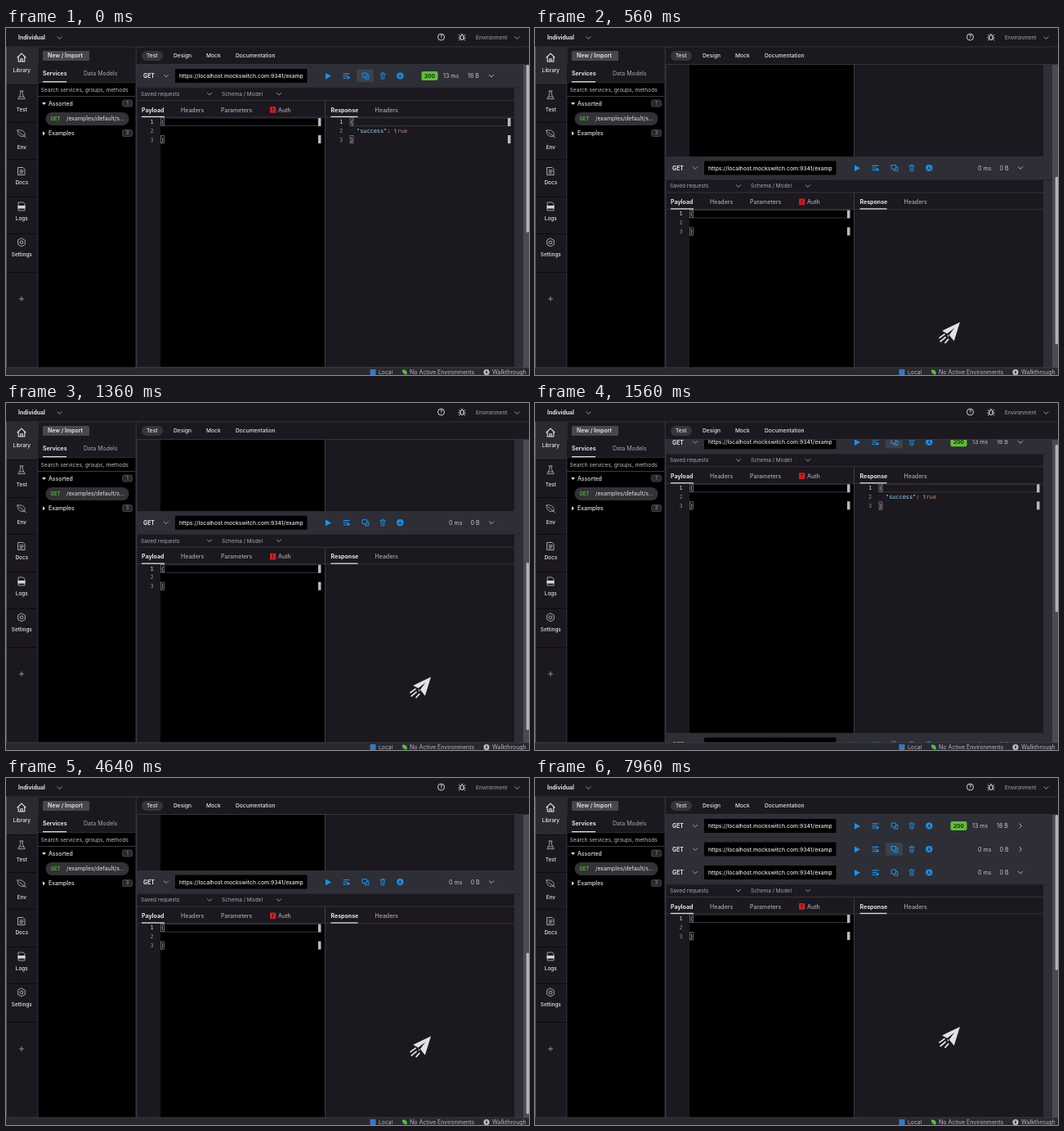
These frames come from a looping animation (640x424 px, 8000 ms). An HTML page:

```html
<!DOCTYPE html>
<html lang="en">
<head>
<meta charset="utf-8">
<style>
html, body { margin: 0; width: 100%; height: 100%; overflow: hidden; background: #1c1820; }
svg { display: block; width: 100vw; height: 100vh; }
text { font-family: Inter, Roboto, sans-serif; white-space: pre; }
.mono { font-family: "DejaVu Sans Mono", "Liberation Mono", monospace; }
</style>
</head>
<body>
<svg id="stage" viewBox="0 0 640 424"></svg>
<script>
const LOOP = 8000;
const FIRST = 58.5, OPEN = 369.5, CLOSED = 28.5, VIEW = 379, TOP = 45, TRACK = 385;
const BLUE = '#1c93ea', INK = '#e4e4e8', DIM = '#a9a8af', BAND = '#2e2e36', BASE = '#1c1820', EDGE = '#3a393f';

const rect = (x, y, w, h, fill, extra = '') =>
  `<rect x="${x}" y="${y}" width="${w}" height="${h}" fill="${fill}" ${extra}/>`;
const hline = (x, y, w, color = EDGE) => rect(x, y, w, 1, color);
const vline = (x, y, h, color = EDGE) => rect(x, y, 1, h, color);
const stroke = (d, color = INK, w = 1, extra = '') =>
  `<path d="${d}" fill="none" stroke="${color}" stroke-width="${w}" stroke-linecap="round" stroke-linejoin="round" ${extra}/>`;
const shape = (d, fill) => `<path d="${d}" fill="${fill}"/>`;
const at = (x, y, body) => `<g transform="translate(${x} ${y})">${body}</g>`;
const text = (x, y, s, size = 6.9, fill = INK, weight = 400, extra = '') =>
  `<text x="${x}" y="${y + size * 0.36}" font-size="${size}" fill="${fill}" font-weight="${weight}" ${extra}>${s}</text>`;
const code = (x, y, s, fill) => text(x, y, s, 6.87, fill, 400, 'class="mono"');
const down = (x, y, color = DIM) => stroke(`M${x - 2.6} ${y - 1.2}l2.6 2.6l2.6-2.6`, color, 0.9);

const icons = {
  home: stroke('M-5 0L0-4.8L5 0M-3.8-.8V5H3.8V-.8M-1.2 5V1.8H1.2V5', INK, 1.1),
  flask: stroke('M-2-5H2M-1.2-5V-1.2L-4.2 4.6H4.2L1.2-1.2V-5M-2.6 2H2.6', DIM, 0.9),
  leaf: stroke('M-5-4C0-5 5-3 4 3C-2 5-5 1-5-4ZM-3-2L5.5 4.8', DIM, 0.9),
  docs: stroke('M-4-4.5H2L4-2.5V4.5H-4ZM-2-1.2H2M-2 .6H2M-2 2.4H1', DIM, 1),
  logs: stroke('M-3.5-5H2L4-3V5H-3.5Z', DIM, 0.9) + rect(-4.5, -1, 9, 3.6, '#d6d6da'),
  gear: stroke('M0-5L4.3-2.5V2.5L0 5L-4.3 2.5V-2.5Z', DIM, 1) +
    `<circle r="1.9" fill="none" stroke="${DIM}"/>`,
  plus: stroke('M-2.6 0H2.6M0-2.6V2.6', DIM, 0.8)
};

function sidebar() {
  const cells = [['home', 'Library', 36, 52], ['flask', 'Test', 82, 100], ['leaf', 'Env', 129, 146],
    ['docs', 'Docs', 175, 189], ['logs', 'Logs', 218, 233], ['gear', 'Settings', 262, 277]];
  return rect(0, 23, 39, 392, BASE) + rect(0, 23, 38, 46, '#2b2a31') +
    cells.map(([icon, label, iy, ty]) => at(19, iy, icons[icon]) +
      text(19.3, ty, label, 6.4, INK, 500, 'text-anchor="middle"')).join('') +
    [69, 115, 160, 206, 251, 298].map(y => hline(0, y, 38, '#0c0b0f')).join('') +
    at(19, 331, icons.plus) + vline(38.5, 23, 392) + rect(0, 23, 0.8, 401, '#64636a');
}

function library() {
  const badge = (y, n) => rect(142.5, y - 4, 12, 8, '#29292d', 'rx="2" stroke="#55555b" stroke-width=".7"') +
    text(148.5, y, n, 5.5, DIM, 400, 'text-anchor="middle"');
  return rect(39, 45, 119.5, 21, BASE) + rect(39.5, 66, 119, 349, '#000') +
    rect(45, 28, 57, 12, '#48474d', 'rx="1.5"') + text(51, 34, 'New / Import', 6.9, INK, 600) +
    text(45, 55.7, 'Services', 6.9, INK, 700) + text(95, 55.7, 'Data Models', 7, DIM) +
    hline(39, 66, 119, '#2b2b30') + rect(45, 65, 29, 1.3, '#dcdce0') +
    text(42.5, 75.3, 'Search services, groups, methods', 6.65, '#bbbac0') + hline(39, 83, 119, '#3b3a40') +
    shape('M44 91h5l-2.5 3z', INK) + text(52, 92.5, 'Assorted', 6.9, INK, 500) + badge(92, '1') +
    rect(48.5, 103, 102, 16, '#323237', 'rx="8"') + text(54.5, 111, 'GET', 6, '#62c544', 500) +
    text(74, 111, '/examples/default/s...', 6.9, INK) +
    shape('M45 126.2v5l3-2.5z', INK) + text(52, 128.5, 'Examples', 6.9, INK, 500) + badge(128.5, '3') +
    vline(158.7, 23, 392);
}

function chrome() {
  const bug = `<ellipse cx="0" cy=".6" rx="2.2" ry="3" fill="none" stroke="${INK}"/>` +
    stroke('M-4-2.5L-2-1M4-2.5L2-1M-4.3 1H-2M4.3 1H2M-3.8 4L-2 2.6M3.8 4L2 2.6M-1.2-3.8L0-2.6L1.2-3.8', INK, 0.8);
  return rect(0, 0, 640, 23, BASE) + text(15, 11.5, 'Individual', 6.9, INK, 700) + down(65.5, 12) +
    `<circle cx="532.5" cy="11" r="4" fill="none" stroke="${INK}" stroke-width=".9"/>` +
    text(532.6, 11, '?', 6, INK, 600, 'text-anchor="middle"') + at(558, 11, bug) +
    text(575, 11.5, 'Environment', 6.5, DIM) + down(625.5, 12) +
    rect(39, 23, 601, 22, BASE) + hline(0, 22.5, 640, '#343339') +
    rect(166, 28, 26, 12, '#36353b', 'rx="6"') +
    [[172, 'Test'], [205, 'Design'], [245, 'Mock'], [281, 'Documentation']]
      .map(([x, s]) => text(x, 34, s, 6.65, INK, 500)).join('') +
    hline(159, 44, 481, '#343339');
}

function footer() {
  return rect(0, 415, 640, 9, '#29282f') + hline(0, 414.5, 640, '#3c3b42') +
    rect(445.5, 417, 7, 7, '#3b78b8') + text(456, 420.5, 'Local', 6.8, '#b9b8c0') +
    shape('M485 417.5C489 417 491.5 419 490.5 423.5C486.5 423.5 484.5 421 485 417.5Z', '#58b947') +
    text(494, 420.5, 'No Active Environments', 7, '#b9b8c0') +
    `<circle cx="588" cy="420.6" r="3.6" fill="#bdbcc3"/>` + shape('M588 418l1 2.6l-1 2.6l-1-2.6z', '#29282f') +
    text(595, 420.5, 'Walkthrough', 7, '#b9b8c0');
}

// Coordinates below are relative to the centre of a request's header band.
function header(done) {
  const copy = stroke('M436.5-3.5H441.5V1.5H436.5ZM439.5 1.5V3.7H443.8V-1.3H441.5', BLUE, 1);
  const list = stroke('M413-2.6H420M413 0H417M413 2.6H416', BLUE, 1.1) + shape('M417.5-.4l4 2.4l-4 2.4z', BLUE);
  const bin = stroke('M458-2.5H464M460-3.8H462M458.8-2.5L459.2 3.7H462.8L463.2-2.5M461-.6V2', BLUE, 0.9);
  return rect(160, -14, 474, 28.5, BAND) + hline(160, 14, 474, '#25242b') +
    text(168, 0.3, 'GET', 6.9, INK, 700) + down(196, 0) +
    rect(207, -8.5, 161.5, 17, '#000', 'rx="1"') +
    text(212, 0.2, 'https://localhost.mockswitch.com:9341/examp', 6.78, INK, 500) +
    '<g class="dup">' + rect(429, -8, 21, 15.5, '#3a424d', 'rx="1"') + '</g>' +
    '<g class="fold">' + rect(584.5, -6.5, 19, 13.5, '#3a3d42', 'stroke="#4b5052" stroke-width=".8"') + '</g>' +
    shape('M391-3.6L398 .3L391 4.2z', BLUE) + list + copy + bin +
    `<circle cx="482.3" cy="0" r="4.1" fill="${BLUE}"/>` + stroke('M480.6 2L482.3-2L484 2M481.2 .8H483.4', BAND, 0.8) +
    (done ? rect(508.5, -5.5, 20, 11, '#62bd3c', 'rx="2"') + text(518.5, 0, '200', 6.6, '#17311a', 700, 'text-anchor="middle"') +
      text(535, 0, '13 ms', 7.1, '#c6c5cb') + text(565, 0, '16 B', 7.1, '#c6c5cb')
      : text(542, 0, '0 ms', 7.1, '#c6c5cb') + text(568.5, 0, '0 B', 7.1, '#c6c5cb')) +
    '<g class="arrow">' + down(0, 0, '#c6c5cb') + '</g>';
}

function editor(x, right, lines) {
  const [a, b, c] = [56, 66.8, 77.6];
  const brace = (y, s) => rect(x, y - 4.7, 4, 9.4, 'none', 'stroke="#85858a" stroke-width=".7"') + code(x, y, s, '#d8d8dc');
  return hline(x + 1, 51, right - x - 5, '#36353a') + hline(x + 1, 60.5, right - x - 5, '#36353a') +
    [a, b, c].map((y, i) => code(x - 13, y, i + 1, i ? '#8d8d94' : '#d6d6da')).join('') +
    brace(a, '{') + lines + brace(c, '}') +
    rect(right - 4, 51.5, 3.5, 10, '#b9b9bb') + rect(right - 4, 72.5, 3.5, 10, '#b9b9bb');
}

function plane() {
  return at(508, 202, shape('M12-13.5L-9.8-3L-3.6.4L5.2-6.4L-1.2 2.2L4.8 9.5Z', '#e2e2e6') +
    shape('M-3.2 1.4L-1.6 2.6L-2.8 5Z', '#e2e2e6') +
    stroke('M-7 1.2L-13 5.6M-5.8 5L-11.8 10M-2.2 7.4L-6 11.6', '#e2e2e6', 1.7));
}

function panel(done) {
  const y = 41.5;
  const reply = code(429, 66.8, '"success"', '#9cdcfe') + code(466.3, 66.8, ':', '#d8d8dc') + code(474.6, 66.8, 'true', '#ce9178');
  return rect(160, 14.5, 462, 341, BASE) + rect(622, 14.5, 12, 341, BAND) +
    text(165, 22, 'Saved requests', 6.5, DIM) + down(249, 22) +
    text(264, 22, 'Schema / Model', 6.5, DIM) + down(334, 22) + hline(160, 29.5, 462, '#34333a') +
    text(166, y, 'Payload', 7, INK, 700) + text(214, y, 'Headers', 7, DIM, 500) +
    text(263, y, 'Parameters', 7, DIM, 500) + rect(323, 37.5, 7.3, 7.8, '#c4222a', 'rx="1"') +
    text(326.6, y, '!', 6, '#3b0a0c', 700, 'text-anchor="middle"') + text(333, y, 'Auth', 7, DIM, 500) +
    text(397.5, y, 'Response', 7, INK, 700) + text(451.5, y, 'Headers', 7, DIM, 500) +
    rect(189, 51, 201, 304.5, '#000') + hline(160, 50, 462, '#323138') +
    rect(166, 49.3, 28, 1.3, '#dcdce0') + rect(397.5, 49.3, 33, 1.3, '#dcdce0') +
    editor(189.5, 386, '') + (done ? editor(421, 618, reply) : plane()) +
    vline(390, 30, 325.5, '#3d3c43') + vline(160, 14.5, 341, '#29282e');
}

const stage = document.getElementById('stage');
stage.innerHTML =
  `<defs><clipPath id="view"><rect x="159" y="${TOP}" width="481" height="370"/></clipPath></defs>` +
  rect(0, 0, 640, 424, BASE) + '<g clip-path="url(#view)">' + rect(159, TOP, 475, 370, BAND) +
  [true, false, false, false].map(done => `<g class="req"><g class="panel">${panel(done)}</g>${header(done)}</g>`).join('') +
  '</g>' + chrome() + sidebar() + library() + footer() +
  rect(633, TOP, 7, 370, '#4a4a52') + '<rect id="thumb" x="636.7" width="3.3" rx="1.6" fill="#b4b4b9"/>';

const thumb = document.getElementById('thumb');
const requests = [...stage.querySelectorAll('.req')].map((el, i) => ({
  el,
  panel: el.querySelector('.panel'),
  dup: el.querySelector('.dup'),
  fold: el.querySelector('.fold'),
  arrow: el.querySelector('.arrow'),
  born: [0, 0, 3950, 7450][i],
  folded: [2850, 5850, Infinity, Infinity][i]
}));

// [start, end, row, button]
const hovers = [[0, 340, 0, 'dup'], [1530, 2400, 0, 'dup'], [2600, 3300, 0, 'fold'], [3650, 4420, 1, 'dup'],
  [5480, 5620, 1, 'dup'], [5720, 6350, 1, 'fold'], [6850, 8000, 1, 'dup']];

const show = (el, on) => el.setAttribute('display', on ? 'inline' : 'none');
const ease = u => u < 0.5 ? 4 * u ** 3 : 1 - 4 * (1 - u) ** 3;
const ramp = (t, a, b) => ease(Math.min(1, Math.max(0, (t - a) / (b - a))));

function draw(t) {
  const trip = t < 3000 ? ramp(t, 301, 734) - ramp(t, 1200, 1650) : ramp(t, 4330, 4780) - ramp(t, 5160, 5610);
  const live = requests.filter(r => t >= r.born);
  const content = live.reduce((h, r) => h + (t < r.folded ? OPEN : CLOSED), -15);
  const scroll = trip * (content - VIEW);
  const hover = hovers.find(h => t >= h[0] && t < h[1]);

  let y = FIRST - scroll;
  requests.forEach((r, i) => {
    const open = t < r.folded;
    show(r.el, t >= r.born);
    show(r.panel, open);
    for (const key of ['dup', 'fold']) show(r[key], hover && hover[2] === i && hover[3] === key);
    r.el.setAttribute('transform', `translate(0 ${y.toFixed(2)})`);
    r.arrow.setAttribute('transform', `translate(594 0) rotate(${open ? 0 : -90})`);
    y += open ? OPEN : CLOSED;
  });
  thumb.setAttribute('y', TOP + scroll * TRACK / content);
  thumb.setAttribute('height', TRACK * TRACK / content);
}

const start = performance.now();
function tick() {
  draw((performance.now() - start) % LOOP);
  requestAnimationFrame(tick);
}
tick();
</script>
</body>
</html>
```
